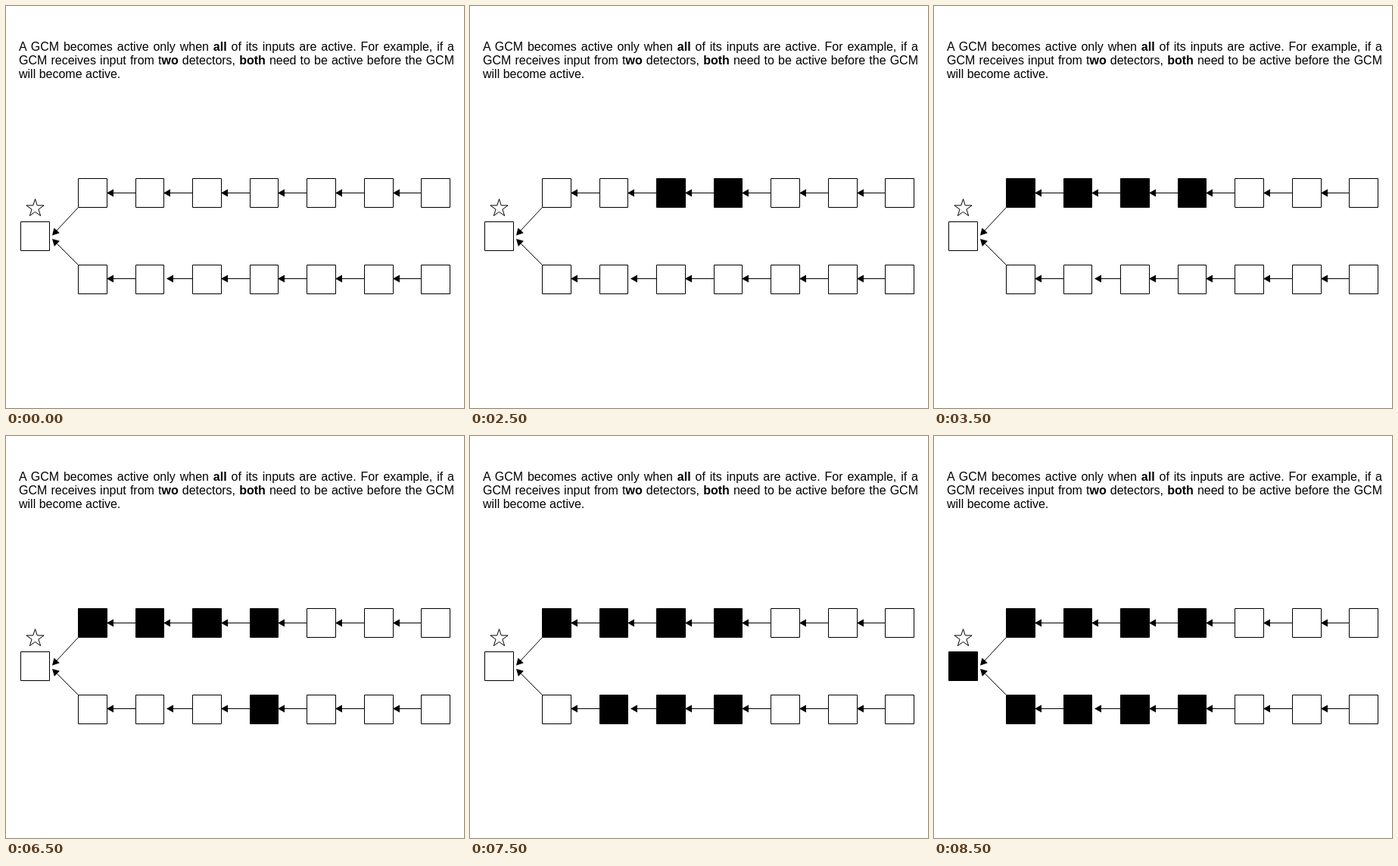
An HTML page for the animation above (9 s loop, 605 px wide and 530 px high).

```html
<!DOCTYPE html>
<html lang="en">
<head>
<meta charset="utf-8">
<title>Gate activation</title>
<style>
  html, body { margin: 0; width: 100%; height: 100%; overflow: hidden; background: #fff; }
  p {
    position: absolute; left: 17px; top: 45px; width: 575px; margin: 0;
    font: 16px/18px "Liberation Sans", Arial, sans-serif;
    text-align: justify; color: #000;
  }
  svg { position: absolute; left: 0; top: 0; display: block; }
</style>
</head>
<body>
<p>A GCM becomes active only when <b>all</b> of its inputs are active. For example, if a GCM receives input from t<b>wo</b> detectors, <b>both</b> need to be active before the GCM will become active.</p>
<svg id="stage" width="605" height="530" viewBox="0 0 605 530" stroke="#000" stroke-width="1" fill="none"></svg>
<script>
const LOOP = 9000;
const STEP = 500;
const COUNT = 7;
const FIRST_ACTIVE = 3;
const stage = document.getElementById("stage");
const boxes = [];

function add(tag, attrs) {
  const node = document.createElementNS("http://www.w3.org/2000/svg", tag);
  for (const key in attrs) node.setAttribute(key, attrs[key]);
  return stage.appendChild(node);
}

function addArrow(x1, y1, x2, y2) {
  const length = Math.hypot(x2 - x1, y2 - y1);
  const ux = (x2 - x1) / length, uy = (y2 - y1) / length;
  const bx = x2 - 9 * ux, by = y2 - 9 * uy;
  add("line", { x1, y1, x2: bx, y2: by });
  add("polygon", {
    points: `${x2},${y2} ${bx - 5 * uy},${by + 5 * ux} ${bx + 5 * uy},${by - 5 * ux}`,
    fill: "#000", stroke: "none"
  });
}

function addBox(left, right, top, start) {
  const node = add("rect", {
    x: left, y: top, width: right - left, height: 38, "stroke-linejoin": "round"
  });
  boxes.push({ node, start });
}

const leftEdge = i => 95.5 + Math.round(75.5 * i);
const rightEdge = i => 133.5 + Math.floor(75.6 * i);

// Activity travels left from the fourth detector of the row.
function addRow(top, arrowY, start, looseGap) {
  for (let i = 0; i < COUNT; i++) {
    if (i < COUNT - 1) {
      const tip = i === looseGap ? rightEdge(i) + 3.5 : rightEdge(i) - 0.5;
      addArrow(leftEdge(i + 1), arrowY, tip, arrowY);
    }
    const delay = i <= FIRST_ACTIVE ? (FIRST_ACTIVE - i) * STEP : Infinity;
    addBox(leftEdge(i), rightEdge(i), top, start + delay);
  }
}

function addStar(cx, cy, radius) {
  const points = Array.from({ length: 10 }, (_, k) => {
    const r = k % 2 ? radius * 0.382 : radius;
    const angle = k * Math.PI / 5;
    return `${cx + r * Math.sin(angle)},${cy - r * Math.cos(angle)}`;
  });
  add("polygon", { points: points.join(" ") });
}

addRow(227.5, 246.5, 2000, -1);
addRow(341.5, 359.5, 6500, 1);
addArrow(95.5, 265.5, 61, 302.5);
addArrow(95.5, 341.5, 61, 307);
addBox(19.5, 57.5, 284.5, 8500);
addStar(38.5, 266.7, 12.2);

function draw(time) {
  for (const { node, start } of boxes) {
    node.setAttribute("fill", time >= start ? "#000" : "#fff");
  }
}

const origin = performance.now();
function tick() {
  draw((performance.now() - origin) % LOOP);
  requestAnimationFrame(tick);
}
tick();
</script>
</body>
</html>
```
